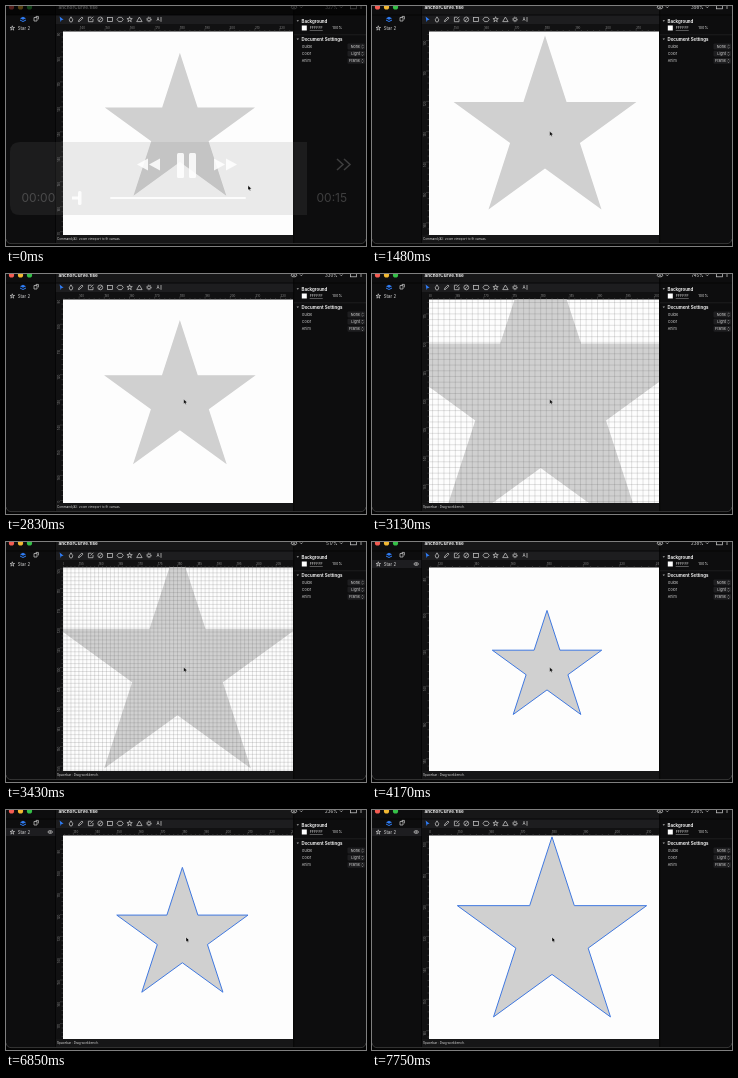
An HTML page for the animation above (8 s loop, 360x240 px).

```html
<!DOCTYPE html>
<html lang="en">
<head>
<meta charset="utf-8">
<title>Star zoom</title>
<style>
  html, body { margin: 0; width: 100%; height: 100%; overflow: hidden; background: #000; }
  svg { display: block; width: 100vw; height: 100vh; }
  text { font-family: Inter, Roboto, sans-serif; font-size: 4.4px; fill: #d8d8d8; }
  .bold { font-weight: 700; fill: #eee; }
  .small { font-size: 3.7px; }
  .end { text-anchor: end; }
  .tick text { font-size: 2.9px; fill: #8a8a8a; text-anchor: middle; }
  .icon { fill: none; stroke: #c4c4c4; stroke-width: .75; }
</style>
</head>
<body>
<svg viewBox="0 0 360 240" preserveAspectRatio="none">
  <defs>
    <clipPath id="page"><rect x="57" y="25.5" width="230" height="203.5"/></clipPath>
    <clipPath id="topClip"><rect x="57" y="18" width="230" height="8"/></clipPath>
    <clipPath id="sideClip"><rect x="50" y="26" width="8" height="203"/></clipPath>
  </defs>

  <!-- window -->
  <rect width="360" height="240" fill="#030303"/>
  <path d="M0 0H360V233Q359 237.5 355 237.5H5Q1 237.5 0 233Z" fill="#0d0d0e"/>
  <rect x="49.5" width="238" height="18" fill="#171718"/>
  <rect x="49.5" y="9" width="238" height="9" fill="#1d1d1f"/>
  <rect x="49.5" y="18" width="238" height="211" fill="#111112"/>
  <rect x="49.5" y="229" width="238" height="8" fill="#161617"/>
  <path d="M0 233Q1 237.6 5 237.6H355Q359 237.6 360 233" fill="none" stroke="#4a4a4a" stroke-width=".7"/>
  <path d="M49.5 0V237M287.7 0V237M0 9H360" fill="none" stroke="#050505" stroke-width=".8"/>

  <!-- title bar -->
  <circle cx="5.5" cy="1" r="2.6" fill="#f45c52"/>
  <circle cx="14.5" cy="1" r="2.6" fill="#f2b832"/>
  <circle cx="23.5" cy="1" r="2.6" fill="#35c048"/>
  <text class="bold" x="52.5" y="3" style="font-size:4.6px">anchorCurve.fise</text>
  <g class="icon">
    <ellipse cx="288" cy="1.2" rx="2.8" ry="1.7"/><circle cx="288" cy="1.2" r=".6"/>
    <path d="M294 .5l1.3 1.3 1.3-1.3M334 .5l1.3 1.3 1.3-1.3"/>
    <rect x="344.5" y="-2" width="6" height="4.8"/><path d="M355 3V-2"/>
  </g>
  <text id="zoom" class="end" x="331.5" y="2.8"></text>

  <!-- tools -->
  <path d="M53.6 10.6l4 3.1-2 .3-1 1.9Z" fill="#2f7df6"/>
  <g class="icon">
    <path d="M65 10.8l1.8 3-.9 2.1h-1.8l-.9-2.1ZM72.4 15.6l.5-1.6 3-3 1.1 1.1-3 3Z"/>
    <path d="M85.5 11.2H82.4V15.7H87V13M84.5 13.6l2.9-2.9"/>
    <circle cx="94.3" cy="13.4" r="2.4"/><path d="M92.9 14.9l2.9-2.9"/>
    <rect x="101.6" y="11.4" width="5" height="4"/>
    <path d="M112.6 11.3h3l1.6 2.1-1.6 2.2h-3L111 13.4Z"/>
    <path id="starTool"/>
    <path d="M133.4 11l2.7 4.6h-5.4Z"/>
    <circle cx="143" cy="13.4" r="1.5"/><circle cx="143" cy="13.4" r="2.3" stroke-dasharray="1 .8"/>
    <path d="M155 11V15.8"/>
  </g>
  <text x="150.4" y="15.2">A</text>

  <!-- layers -->
  <rect id="row" y="18" width="49.3" height="8" fill="#1d1d20"/>
  <path d="M17 10.7l3 1.5-3 1.5-3-1.5ZM14 13.6l3 1.5 3-1.5v.9l-3 1.5-3-1.5Z" fill="#2f7df6"/>
  <g class="icon">
    <path d="M28 11.5h3v3.5h-3ZM30 11v-.6h2.4v3"/>
    <path id="starLayer"/>
    <g id="eye"><ellipse cx="44.2" cy="22" rx="2.2" ry="1.4"/><circle cx="44.2" cy="22" r=".5"/></g>
  </g>
  <text x="11.8" y="23.6">Star 2</text>

  <!-- settings -->
  <path d="M290.6 14.2h2.4l-1.2 1.6ZM290.6 32.4h2.4l-1.2 1.6Z" fill="#aaa"/>
  <text class="bold" x="295.5" y="16.6">Background</text>
  <rect x="295.8" y="19.5" width="5" height="5" fill="#fff"/>
  <text class="small" x="303.7" y="23.4" text-decoration="underline">FFFFFF</text>
  <text class="small" x="326.3" y="23.4">100%</text>
  <path d="M288 28.8H360" stroke="#242426" stroke-width=".7"/>
  <text class="bold" x="295.5" y="34.8">Document Settings</text>
  <g id="fields"></g>
  <text id="hint" x="51" y="234.3" style="font-size:3.1px"></text>

  <!-- canvas -->
  <rect x="57" y="25.5" width="230" height="203.5" fill="#fdfdfd"/>
  <g clip-path="url(#page)">
    <path id="star" fill="#d0d0d0" stroke-width="1"/>
    <path id="grid" fill="none" stroke="#505050" stroke-opacity=".3" stroke-width=".55"/>
  </g>
  <g class="tick" clip-path="url(#topClip)"><g id="top"></g></g>
  <g class="tick" clip-path="url(#sideClip)"><g id="side"></g></g>

  <!-- player controls -->
  <rect id="shade" width="360" height="9" opacity="0"/>
  <g id="player">
    <path d="M14 136H301V209H14Q4 209 4 199V146Q4 136 14 136Z" fill="#7c7c7c" fill-opacity=".14"/>
    <g fill="#fff" fill-opacity=".85">
      <path d="M142 152.500V164.500L131 158.500ZM154 152.500V164.500L143 158.500ZM208 152.500V164.500L219 158.500ZM220 152.500V164.500L231 158.500Z"/>
      <rect x="171" y="147" width="7" height="25" rx="1.500"/>
      <rect x="183" y="147" width="7" height="25" rx="1.500"/>
      <rect x="104" y="191" width="136" height="2" rx="1"/>
      <rect x="72" y="185" width="3.500" height="14" rx="1.500"/>
      <rect x="66" y="190.500" width="7" height="3"/>
    </g>
    <g opacity=".2">
      <text x="15.500" y="195.500" style="font-size:12px;fill:#fff">00:00</text>
      <text x="310.500" y="195.500" style="font-size:12px;fill:#fff">00:15</text>
      <path d="M331 153l6 5.500-6 5.500M338 153l6 5.500-6 5.500" fill="none" stroke="#fff" stroke-width="1.500"/>
    </g>
  </g>

  <path id="cursor" d="M0 0V4.600L1.100 3.700 1.900 5.300 2.700 4.900 2 3.400 3.500 3.200Z" fill="#000" stroke="#fff" stroke-width=".35"/>
</svg>
<script>
const $ = id => document.getElementById(id);
const LOOP = 8000, TICK = 149;

// [tick, star radius]
const sizes = [[0, 79], [8, 79], [15, 157], [16, 160], [19, 79.7], [21, 180], [22, 184], [25, 57.5],
  [45, 57.5], [46, 69], [48, 69], [49, 83], [51, 83], [52, 99.5]];
// [tick, x, y]
const moves = [[0, 242, 179.5], [1, 242, 179.5], [8, 177.7, 125.3], [28, 177.7, 125.3], [32, 184, 130],
  [34, 184, 130], [37, 204.5, 134.5], [38, 204.5, 134.5], [41, 180.4, 127.6], [42, 180.4, 127.6], [44, 180, 127.2]];

function at(keys, n, col = 1) {
  const i = keys.findIndex(k => k[0] > n);
  if (i < 0) return keys[keys.length - 1][col];
  const a = keys[i - 1], b = keys[i];
  const p = (n - a[0]) / (b[0] - a[0]);
  return a[col] * (b[col] / a[col]) ** p;
}

function starPath(cx, cy, r) {
  let d = '';
  for (let i = 0; i < 10; i++) {
    const q = i % 2 ? r * 0.382 : r, a = i * Math.PI / 5;
    d += (i ? 'L' : 'M') + (cx + q * Math.sin(a)).toFixed(2) + ' ' + (cy - q * Math.cos(a)).toFixed(2);
  }
  return d + 'Z';
}

function ruler(center, unit, mid, lo, hi, vertical) {
  const step = unit < 2.1 ? 20 : unit < 3.9 ? 10 : 5;
  const first = Math.floor((lo - center) / unit + mid);
  const last = Math.ceil((hi - center) / unit + mid);
  let d = '', labels = '';
  for (let v = Math.floor(first / step) * step; v <= last; v += step / 5) {
    const p = center + (v - mid) * unit, major = v % step === 0;
    const len = major ? 3 : 1.5;
    d += vertical ? `M57 ${p}h${-len}` : `M${p} 25.5v${-len}`;
    if (!major) continue;
    labels += vertical
      ? `<text transform="translate(54 ${p + 2.5}) rotate(-90)">${v}</text>`
      : `<text x="${p + 2.5}" y="22.6">${v}</text>`;
  }
  return `<path d="${d}" stroke="#666" stroke-width=".4"/>${labels}`;
}

function lines(center, unit, lo, hi, cmd) {
  let d = '';
  for (let p = center - Math.floor((center - lo) / unit) * unit; p < hi; p += unit) d += cmd(p.toFixed(2));
  return d;
}

function draw(n) {
  const r = at(sizes, n), unit = r * 0.0316, late = n >= 46;
  const cx = late ? 175 + (r - 57.5) * 5 / 42 : 178 - 0.052 * r;
  const cy = late ? 126.4 : 126.3 - 0.006 * r;
  const hover = n >= 28 && n < 36 || n >= 40;

  $('star').setAttribute('d', starPath(cx, cy, r));
  $('star').setAttribute('stroke', hover ? '#3f78e0' : 'none');
  $('row').style.opacity = $('eye').style.opacity = hover ? 1 : 0;
  $('grid').setAttribute('d', r < 120 ? '' :
    lines(cx, unit, 57, 287, p => `M${p} 25V229`) + lines(cy, unit, 25, 229, p => `M57 ${p}H287`));
  $('top').innerHTML = ruler(cx, unit, 180, 57, 287, false);
  $('side').innerHTML = ruler(cy, unit, 130, 26, 229, true);
  $('zoom').textContent = Math.round((late ? 57.1 : r) * 4.14) + '%';
  $('hint').textContent = n < 20 ? 'Command(⌘): zoom viewport to fit canvas.' : 'Spacebar : Drag workbench.';
  $('player').style.opacity = Math.max(0, 1 - n / 6);
  $('shade').style.opacity = Math.max(0, 0.65 * (1 - n / 10));
  $('cursor').setAttribute('transform', `translate(${at(moves, n)} ${at(moves, n, 2)})`);
}

$('starTool').setAttribute('d', starPath(123.6, 13.5, 2.8));
$('starLayer').setAttribute('d', starPath(6.3, 22.2, 2.4));
$('fields').innerHTML = [['Guide', 'None'], ['Color', 'Light'], ['Anim', 'Frame']].map(([name, value], i) => {
  const y = 41.8 + i * 7.2;
  return `<rect x="341.5" y="${y - 4.2}" width="17.5" height="5.8" rx="1" fill="#1e1e20"/>
    <text class="small" x="295.8" y="${y}">${name}</text>
    <text class="small end" x="354" y="${y}">${value}</text>
    <path class="icon" d="M355.6 ${y - 1.9}l.9-.9.9.9m0 1.4l-.9.9-.9-.9" style="stroke-width:.5"/>`;
}).join('');

let shown = -1;
function frame() {
  const n = Math.floor((performance.now() % LOOP + 15) / TICK);
  if (n !== shown) draw(shown = n);
  requestAnimationFrame(frame);
}
frame();
</script>
</body>
</html>
```
